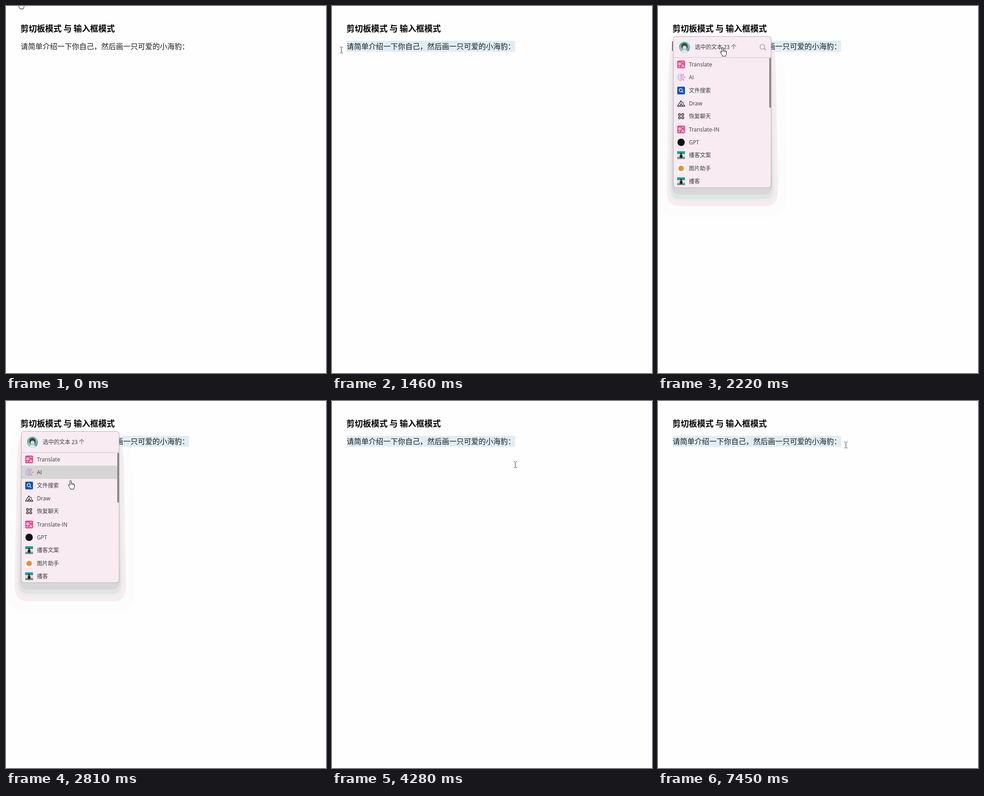
Recreate the animation shown at these times as an HTML page with a canvas. Size 699 by 801 pixels, loop 8000 ms.

```html
<!DOCTYPE html>
<html lang="zh-CN">
<head>
<meta charset="utf-8">
<title>剪切板模式 与 输入框模式</title>
<style>
html, body { margin: 0; width: 100%; height: 100%; overflow: hidden; background: #fefefe; }
canvas { display: block; }
</style>
</head>
<body>
<canvas id="stage" width="699" height="801"></canvas>
<script>
const ctx = document.getElementById('stage').getContext('2d');
const LOOP = 8000, STEP = 57, ROW_H = 28.33, LIST_TOP = 113;
const CJK = '"Noto Sans CJK SC", "Noto Sans CJK", sans-serif';
const LATIN = '"Open Sans", "Noto Sans", sans-serif';
const MENU_OPEN = 2040, MENU_HOVER = 2630, MENU_CLOSE = 3630;
const CARET_FLIPS = [2220, 2790, 3390, 3950, 4520, 5050, 5630, 6220, 6830, 7450];

// Pointer path: time, x, y
const PATH = [
  [0, 31, -13], [29, 31, -13], [30, 46, 4], [640, 410, 96], [850, 410, 96],
  [1410, 20, 96], [1510, 20, 96], [1620, 133, 91], [1670, 141, 91],
  [2039, 141, 91], [2040, 141, 90], [2630, 141, 90], [2810, 141, 173],
  [3080, 141, 374], [3440, 139, 258], [3830, 139, 258], [4280, 400, 139],
  [4600, 405, 118], [4800, 412, 105], [5050, 409, 97], [6059, 409, 97],
  [6060, 410, 97], [6829, 410, 97], [6830, 410, 96], [LOOP, 410, 96]
];

const ITEMS = [
  ['Translate', translateIcon], ['AI', brainIcon], ['文件搜索', searchTile],
  ['Draw', triangleIcon], ['恢复聊天', gridIcon], ['Translate-IN', translateIcon],
  ['GPT', (x, y) => disc(x, y, 8, '#111')], ['播客文案', photoIcon],
  ['图片助手', pictureIcon], ['播客', photoIcon]
];

function pointer(t) {
  const i = Math.max(1, PATH.findIndex(k => k[0] > t));
  const [t0, x0, y0] = PATH[i - 1], [t1, x1, y1] = PATH[i];
  const n = Math.max(1, Math.round((t1 - t0) / STEP));
  let p = Math.floor((t - t0) / (t1 - t0) * n + 1e-6) / n;
  if (t1 - t0 > 400) p = p * p * (3 - 2 * p);
  return { x: x0 + (x1 - x0) * p, y: y0 + (y1 - y0) * p };
}

function rect(x, y, w, h, color) {
  ctx.fillStyle = color;
  ctx.fillRect(x, y, w, h);
}

function disc(x, y, r, color) {
  ctx.fillStyle = color;
  ctx.beginPath();
  ctx.arc(x, y, r, 0, 7);
  ctx.fill();
}

function tile(x, y, w, h, r, color) {
  ctx.fillStyle = color;
  ctx.beginPath();
  ctx.roundRect(x, y, w, h, r);
  ctx.fill();
}

function line(d, color, width = 1) {
  ctx.strokeStyle = color;
  ctx.lineWidth = width;
  ctx.stroke(new Path2D(d));
}

function text(s, x, y, font, color) {
  ctx.font = font;
  ctx.fillStyle = color;
  ctx.fillText(s, x, y);
}

function at(x, y, draw) {
  ctx.save();
  ctx.translate(x, y);
  draw();
  ctx.restore();
}

function translateIcon(x, y) {
  tile(x - 8.5, y - 8.5, 17, 17, 2.5, '#e84a8c');
  text('中', x - 7, y + 2, `bold 8px ${CJK}`, '#fff');
  text('A', x + .5, y + 6, `bold 9px ${LATIN}`, '#fff');
  at(x, y, () => line('M1.5 -5.5H4.5V-3M-5 3.5V5.5H-2', '#fff'));
}

function brainIcon(x, y) {
  at(x, y, () => {
    const g = ctx.createLinearGradient(-7, -7, 2, 7);
    g.addColorStop(0, '#5b9df0');
    g.addColorStop(1, '#c27be0');
    line('M0 -7C-3 -9 -5 -7 -5 -5C-8 -4 -8 -1 -6.5 0C-8 2 -7 5 -5 5C-4 8 -1 8 0 7ZM-5 -1Q-3 -3 -2 -1M-5 3Q-2 1 -2 5M-3 -5Q-1 -5 -1 -3', g);
    line('M2 -7V7M2 -3H5V-6M2 0H8M2 3H5V6', '#ee88a0');
    for (const [dx, dy, c] of [[5, -6, '#f08c70'], [8, 0, '#e86c9c'], [5, 6, '#a07ce8']]) disc(dx, dy, 1.2, c);
  });
}

function searchTile(x, y) {
  tile(x - 8.5, y - 8.5, 17, 17, 2, '#1657b4');
  at(x, y, () => line('M-4.2 -.8A3.4 3.4 0 1 1 2.6 -.8A3.4 3.4 0 1 1 -4.2 -.8M1.6 1.6L4.8 4.8', '#fff', 1.2));
}

function triangleIcon(x, y) {
  at(x, y, () => line('M-8 6L-.5 -5.5L2 -1.5M-8 6H8L4 0M-3 5.5L0 .5L3.5 6M3 -3L5 -1', '#111', 1.3));
}

function gridIcon(x, y) {
  ctx.strokeStyle = '#222';
  ctx.lineWidth = 1.4;
  for (const dx of [-3.5, 3.5]) for (const dy of [-3.5, 3.5]) {
    ctx.beginPath();
    ctx.arc(x + dx, y + dy, 2.3, 0, 7);
    ctx.stroke();
  }
}

function photoIcon(x, y) {
  rect(x - 8.5, y - 8.5, 17, 17, '#d9e3df');
  rect(x - 8.5, y - 8.5, 17, 6, '#17a092');
  rect(x - 8.5, y + 4, 17, 4.5, '#7f8b89');
  disc(x, y - 3, 2, '#222');
  tile(x - 3, y - 1, 6, 7, 2, '#222');
}

function pictureIcon(x, y) {
  rect(x - 8.5, y - 8.5, 17, 17, '#fff');
  disc(x, y, 6, '#ee8a3c');
}

function avatar(x, y) {
  ctx.save();
  ctx.beginPath();
  ctx.arc(x, y, 12, 0, 7);
  ctx.clip();
  const g = ctx.createLinearGradient(x - 8, y - 12, x + 8, y + 12);
  g.addColorStop(0, '#3f9a78');
  g.addColorStop(.5, '#8accc0');
  g.addColorStop(1, '#4a8caa');
  rect(x - 12, y - 12, 24, 24, g);
  disc(x, y - 2, 7, '#28474f');
  disc(x, y + 1, 4.5, '#edcfc2');
  tile(x - 7, y + 6, 14, 10, 5, '#dce8ec');
  ctx.restore();
}

function band(left, top, right, bottom, r, color) {
  ctx.fillStyle = color;
  ctx.fill(new Path2D(`M34 ${top}Q${left + 5} ${top + 20} ${left + 4} 160L${left} ${bottom - r - 6}
    Q${left} ${bottom} ${left + r} ${bottom}H${right - r}
    Q${right} ${bottom} ${right} ${bottom - r - 6}L${right - 4} 160Q${right - 5} ${top + 20} 247 ${top}Z`));
}

function menuShadow() {
  band(0, 61, 281, 460, 44, '#fcfcfc');
  band(19, 70, 262, 437, 28, '#f9ebf1');
  band(24, 76, 256, 427, 24, '#e8efe9');
  band(27, 80, 252, 421, 20, '#e2e3e2');
  band(30, 84, 249, 411, 16, '#d6d7d6');
}

function menu(hover) {
  const hovering = hover !== null;
  tile(33, 66, 214.5, 331, 6, '#b5aeb2');
  tile(34, 67, 212.5, 329, 5, '#f9ebf2');
  avatar(58, 90);
  text('选中的文本 23 个', 80.5, 94, `300 12px ${CJK}`, '#3c3c3c');
  if (!hovering) line('M222.8 89A5.2 5.2 0 1 1 233.2 89A5.2 5.2 0 1 1 222.8 89M232 93L235.8 96.5', '#858085', 1.1);
  rect(34, 112, 213, 1, '#cfc6cb');
  if (hovering && hover >= 0) rect(34, Math.round(LIST_TOP + hover * ROW_H), 209, 29, '#d5d5d5');
  ITEMS.forEach(([label, icon], i) => {
    const y = Math.round(LIST_TOP + (i + .5) * ROW_H);
    icon(50.5, y + .5);
    const font = /[a-z]/i.test(label) ? `11.9px ${LATIN}` : `300 12px ${CJK}`;
    text(label, 67.5, y + 4.5, font, '#3c3c3c');
  });
  tile(243, 113, 4, 109, 2, '#8b868a');
}

function hand(x, y) {
  at(x, y, () => {
    const p = new Path2D('M-1.5 11V1.5Q-1.5 .5 0 .5T1.5 1.5V6.5Q4 5.5 4.3 7.3Q6.5 6.5 6.6 8.2Q8.5 8 8.5 10V14.5Q8.5 16 7 17.5V19.5H-.5V18Q-2 16.5 -3 14L-5 11Q-5 9 -3.4 9.5Z');
    ctx.fillStyle = '#fff';
    ctx.fill(p);
    ctx.strokeStyle = '#111';
    ctx.lineWidth = 1;
    ctx.stroke(p);
    line('M1.5 6V10M4.3 7.3V10.5M6.6 8.2V10.5', '#111', .9);
  });
}

function beam(x, y) {
  at(Math.round(x), Math.round(y), () => line('M-3 -6.5H-.5M1.5 -6.5H4M.5 -6V6M-3 6.5H-.5M1.5 6.5H4', '#333'));
}

function draw(t) {
  const open = t >= MENU_OPEN && t < MENU_CLOSE;
  const pos = pointer(t);
  rect(0, 0, 699, 801, '#fefefe');
  if (open) menuShadow();
  if (t >= 850) {
    const col = Math.round((pos.x - 32) / 16);
    const left = t < 1460 ? 32 + 16 * Math.min(23, Math.max(0, col)) : 32;
    rect(left, 76, 400 - left, 24, '#e0edf6');
  }
  text('剪切板模式 与 输入框模式', 31.5, 56, `bold 18px ${CJK}`, '#000');
  text('请简单介绍一下你自己，然后画一只可爱的小海豹：', 32, 94, `300 16px ${CJK}`, '#1c1c1c');
  if (CARET_FLIPS.filter(f => f <= t).length % 2) rect(31, 77, 1, 21, '#000');
  if (open) {
    const row = Math.floor((pointer(t - 60).y - LIST_TOP) / ROW_H);
    menu(t >= MENU_HOVER ? Math.min(row, ITEMS.length - 1) : null);
  }
  (open || t < 30 ? hand : beam)(pos.x, pos.y);
}

const start = performance.now();
function tick() {
  draw((performance.now() - start) % LOOP);
  requestAnimationFrame(tick);
}
tick();
</script>
</body>
</html>
```
